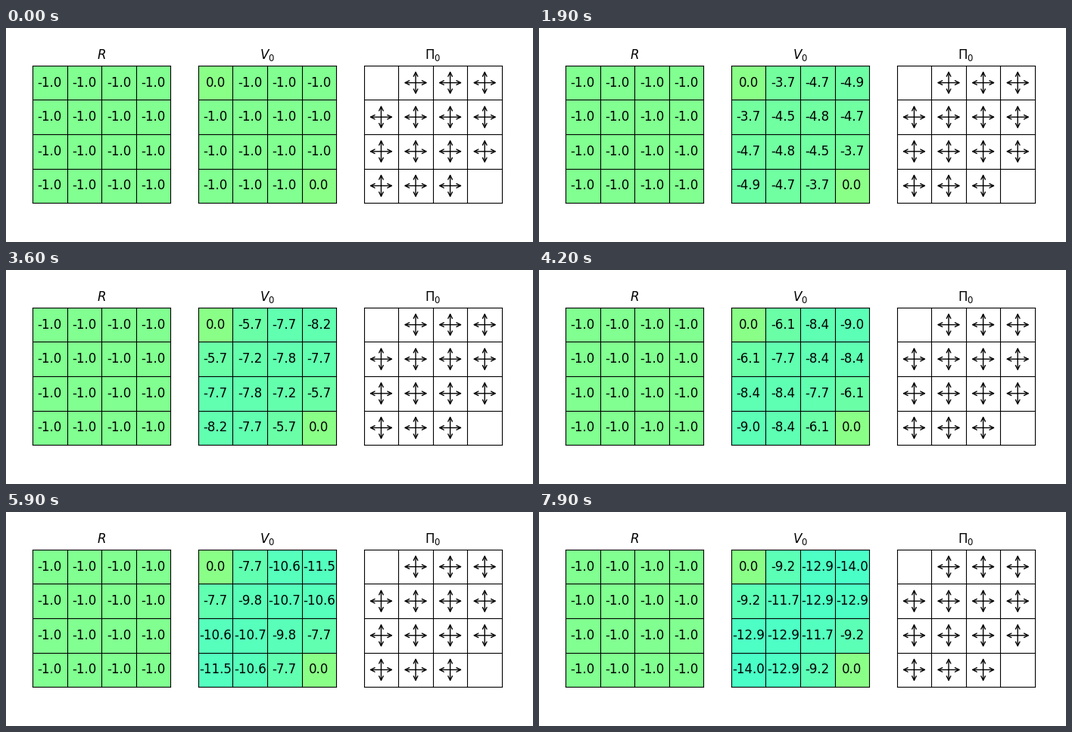
Animation, 696 px wide and 284 px high, one loop 8000 ms. Source, as a matplotlib script:

```python
import numpy as np
import matplotlib.pyplot as plt
from matplotlib.animation import FuncAnimation
from matplotlib.patches import FancyArrowPatch, Rectangle

W, H = 696, 284
N = 4
SIDE = 620 / 3.4          # three square panels with gaps of a fifth of their width
CELL, STEP = SIDE / N, 1.2 * SIDE
LEFT, TOP = 35, 49.82
FRAMES, INTERVAL = 80, 100
TERMINAL = ((0, 0), (N - 1, N - 1))

# Frame at which each sweep of the evaluation appears
STARTS = [0, 4, 8] + [round(14 + 4.31 * j) for j in range(16)]

plt.rcParams["font.family"] = "DejaVu Sans"
fig = plt.figure(figsize=(W / 100, H / 100), dpi=100, facecolor="white")
ax = fig.add_axes([0, 0, 1, 1])
ax.set(xlim=(0, W), ylim=(H, 0))
ax.axis("off")


def sweep(v):
    """One synchronous backup under the uniform random policy."""
    p = np.pad(v, 1, mode="edge")
    new = -1 + (p[:-2, 1:-1] + p[2:, 1:-1] + p[1:-1, :-2] + p[1:-1, 2:]) / 4
    for cell in TERMINAL:
        new[cell] = 0
    return new


def shade(v):
    rgb = np.array(plt.cm.jet(0.5 - 0.0095 * abs(v) ** 0.83)[:3])
    return 0.9 * rgb + 0.1


def center(left, row, col):
    return left + (col + 0.5) * CELL, TOP + (row + 0.5) * CELL


def draw_panel(index, title):
    """Draw the title and grid, and return the panel's left edge."""
    left = LEFT + index * STEP
    ax.text(left + SIDE / 2, TOP - 6 * 100 / 72, title, size=12,
            ha="center", va="baseline")
    style = dict(color="black", linewidth=0.8, solid_capstyle="projecting", zorder=2)
    for i in range(N + 1):
        x, y = left + i * CELL, TOP + i * CELL
        ax.plot([x, x], [TOP, TOP + SIDE], **style)
        ax.plot([left, left + SIDE], [y, y], **style)
    return left


def draw_values(index, title):
    left = draw_panel(index, title)
    cells = {}
    for r, c in np.ndindex(N, N):
        patch = ax.add_patch(Rectangle((left + c * CELL, TOP + r * CELL),
                                       CELL, CELL, linewidth=0))
        label = ax.text(*center(left, r, c), "", size=12, ha="center", va="center")
        cells[r, c] = patch, label
    return cells


def set_values(cells, values):
    for rc, (patch, label) in cells.items():
        patch.set_facecolor(shade(values[rc]))
        label.set_text(f"{values[rc]:.1f}")


def draw_policy(index, title, reach=0.4 * CELL):
    left = draw_panel(index, title)
    for rc in np.ndindex(N, N):
        if rc in TERMINAL:
            continue
        x, y = center(left, *rc)
        for dx, dy in ((reach, 0), (0, reach)):
            ax.add_patch(FancyArrowPatch(
                (x - dx, y - dy), (x + dx, y + dy), arrowstyle="<->",
                mutation_scale=10, shrinkA=2, shrinkB=2, linewidth=1, color="black"))


sweeps = [sweep(np.zeros((N, N)))]
while len(sweeps) < len(STARTS):
    sweeps.append(sweep(sweeps[-1]))

set_values(draw_values(0, "$R$"), -np.ones((N, N)))
value_cells = draw_values(1, "$V_0$")
draw_policy(2, r"$\Pi_0$")


def update(frame):
    k = np.searchsorted(STARTS, frame, side="right") - 1
    set_values(value_cells, sweeps[k])
    return []


anim = FuncAnimation(fig, update, frames=FRAMES, interval=INTERVAL,
                     repeat=True, repeat_delay=0, blit=False)
plt.show()
```
